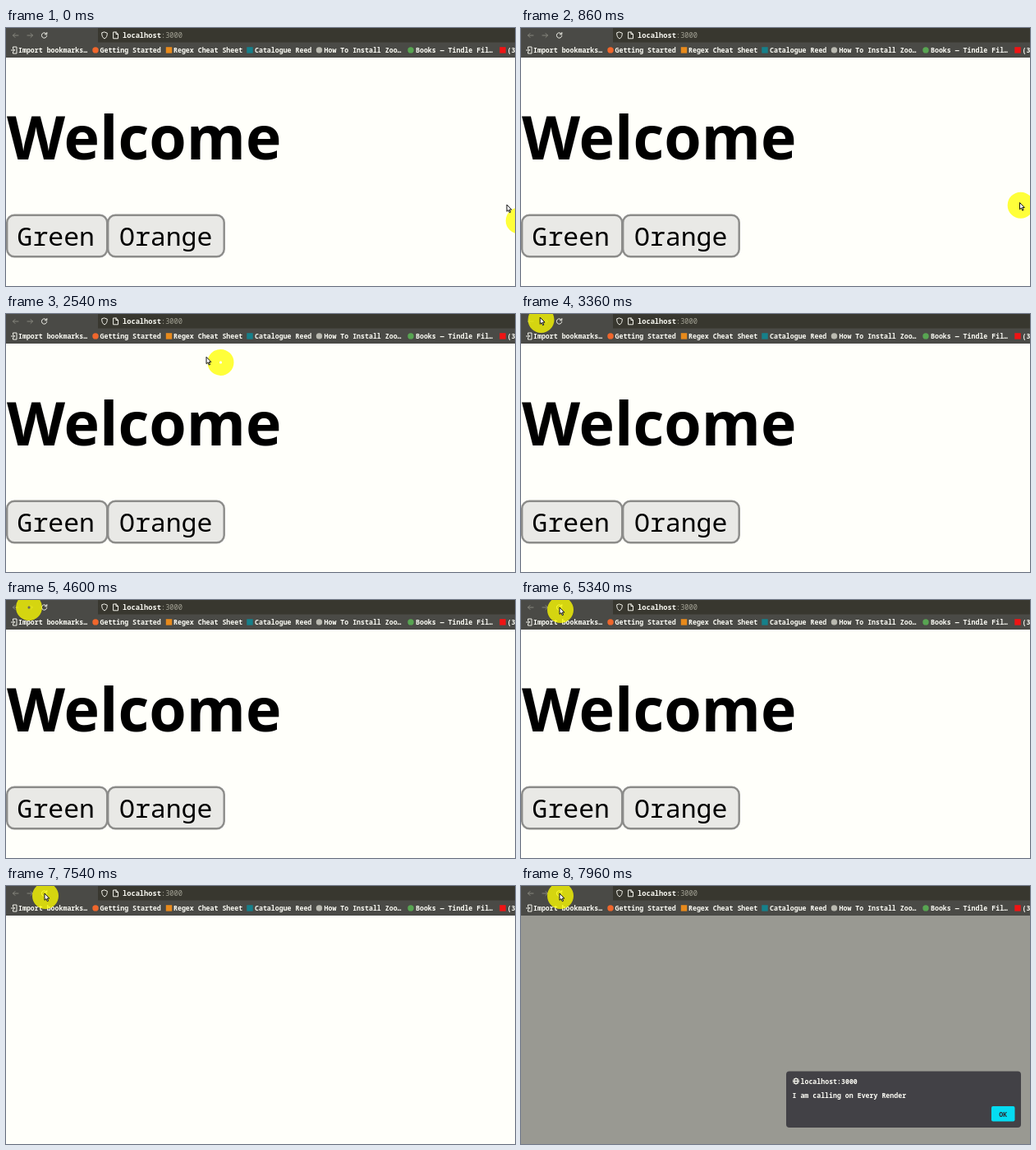
An HTML page that plays this animation: 620x314 px, repeating every 8000 ms.

```html
<!DOCTYPE html>
<html lang="en">
<head>
<meta charset="utf-8">
<title>Welcome</title>
<style>
  html, body { margin: 0; width: 100%; height: 100%; overflow: hidden; background: #fffffa; }
  svg { display: block; width: 620px; height: 314px; }
  text { font-family: "Noto Sans Mono", "DejaVu Sans Mono", monospace; white-space: pre; }
  .ui { font-size: 8.25px; font-weight: 600; fill: #fbfbf4; }
  .url { font-size: 8.7px; }
  .bold { font-weight: 700; }
  .line { fill: none; stroke: #f2f2ea; stroke-width: 1; stroke-linecap: round; stroke-linejoin: round; }
  .faint { stroke: #85857c; }
  .title { font: 700 73.5px "Open Sans", "Noto Sans", sans-serif; }
  .button rect { fill: #e9e9e6; stroke: #8c8c8a; stroke-width: 2.4; }
  .button text { font-size: 31.5px; font-weight: 500; }
</style>
</head>
<body>
<svg viewBox="0 0 620 314">
  <rect width="620" height="314" fill="#fffffa"/>

  <g id="page">
    <text class="title" x="1" y="160">Welcome</text>
    <g class="button">
      <rect x="1.2" y="227.7" width="122" height="50.5" rx="9"/>
      <text x="13.5" y="264.5">Green</text>
    </g>
    <g class="button">
      <rect x="124.2" y="227.7" width="141.5" height="50.5" rx="9"/>
      <text x="138" y="264.5">Orange</text>
    </g>
  </g>

  <g id="alert">
    <rect y="36" width="620" height="278" fill="#999992"/>
    <rect x="323" y="225.5" width="286" height="68.5" rx="4" fill="#424146"/>
    <g class="line" stroke-width=".8">
      <circle cx="335" cy="237.5" r="3.5"/>
      <ellipse cx="335" cy="237.5" rx="1.6" ry="3.5"/>
      <path d="M331.5 237.5h7"/>
    </g>
    <text class="ui bold" x="340.5" y="240.5">localhost:3000</text>
    <text class="ui" x="330.5" y="258.3">I am calling on Every Render</text>
    <rect x="573" y="268" width="28.5" height="18.5" rx="2" fill="#05dcf2"/>
    <text class="ui bold" x="582.2" y="280.5" style="fill:#2b2a33">OK</text>
  </g>

  <g id="toolbar">
    <rect width="620" height="36" fill="#4a4a46"/>
    <rect x="112" width="508" height="17.5" fill="#38372f"/>
    <path class="line faint" d="M15 9H8.5m2.5-2.5L8.5 9l2.5 2.5M26 9h6.5M30 6.5L32.5 9L30 11.5"/>
    <path class="line" d="M49.3 7.2A3.2 3.2 0 1 0 49.8 9.5M49.8 5.5v2.3h-2.3"/>
    <path class="line" d="M120 5l3.300 1.200c0 3.500-.8 5.500-3.300 6.800c-2.500-1.300-3.300-3.300-3.300-6.800z"/>
    <path class="line" d="M131 5h3.2l2.3 2.3v5.500h-5.500zM134 5v2.500h2.500"/>
    <text class="ui url bold" x="142" y="11.8">localhost<tspan font-weight="400" fill="#a4a396">:3000</tspan></text>
    <path class="line" d="M8.5 25v-2h4.500v8h-4.500v-2M6.500 27h4m-1.500-1.500l1.500 1.500l-1.500 1.500"/>
  </g>

  <!-- The halo is a thick ring with a pinhole in its centre. -->
  <circle id="halo" r="8.8" fill="none" stroke="#ff0" stroke-width="14.4" stroke-opacity=".77"/>
  <path id="arrow" d="M0 0V8.300L1.900 6.600L3.300 9.700L4.600 9.100L3.200 6.100H5.800Z" fill="#fff" stroke="#111" stroke-width="1"/>
</svg>
<script>
const LOOP = 8000, STEP = 112, LAG = 55;
const BLANK_AT = 7530, ALERT_AT = 7700;
const $ = id => document.getElementById(id);

function add(parent, tag, attrs, text = "") {
  const el = document.createElementNS(parent.namespaceURI, tag);
  for (const key in attrs) el.setAttribute(key, attrs[key]);
  el.textContent = text;
  parent.append(el);
}

// label, text x, icon centre x, icon colour, icon roundness
const bookmarks = [
  ["Import bookmarks…", 15],
  ["Getting Started", 114.5, 109, "#f0662c", 4],
  ["Regex Cheat Sheet", 204, 198.5, "#e88a1c", 0],
  ["Catalogue Reed", 303, 297, "#16808a", 0],
  ["How To Install Zoo…", 387.5, 381.5, "#b9b9b0", 3.5],
  ["Books — Tindle Fil…", 499, 493, "#58a552", 4],
  ["(3", 610.5, 605, "#f01414", 0],
];
for (const [label, x, cx, fill, rx] of bookmarks) {
  add($("toolbar"), "text", { class: "ui", x, y: 29.8 }, label);
  if (cx) add($("toolbar"), "rect", { x: cx - 3.7, y: 23.2, width: 7.4, height: 7.4, rx, fill });
}

// Pointer tip: time, x, y. It rests at the right, sweeps to the toolbar,
// wanders over the arrows and settles on reload.
const path = [
  [-60, 625, 233], [0, 610, 215], [1240, 606, 211],
  [1680, 476, 146], [2240, 311, 67], [3200, 24, 4],
  [3400, 23, 4], [3900, 14, 5], [4440, 23, 5], [4530, 27, 6],
  [4700, 27, 6], [5200, 47, 9], [LOOP, 47, 9],
];

function tipAt(t) {
  const i = path.findIndex(p => p[0] > t);
  const [t0, x0, y0] = path[i - 1], [t1, x1, y1] = path[i];
  const k = (t - t0) / (t1 - t0);
  return [x0 + (x1 - x0) * k, y0 + (y1 - y0) * k];
}

const place = (id, x, y) => $(id).setAttribute("transform", `translate(${x} ${y})`);
const show = (id, on) => $(id).setAttribute("visibility", on ? "visible" : "hidden");

function draw(now) {
  const t = now % LOOP;
  const held = Math.floor(t / STEP) * STEP;
  const [x, y] = tipAt(held);
  const [hx, hy] = tipAt(held - LAG);
  place("arrow", x, y);
  place("halo", hx + 1, hy + 3);
  show("arrow", t < 4540 || t > 4720);
  show("page", t < BLANK_AT);
  show("alert", t >= ALERT_AT);
}

const start = performance.now();
function tick() {
  draw(performance.now() - start);
  requestAnimationFrame(tick);
}
tick();
</script>
</body>
</html>
```
